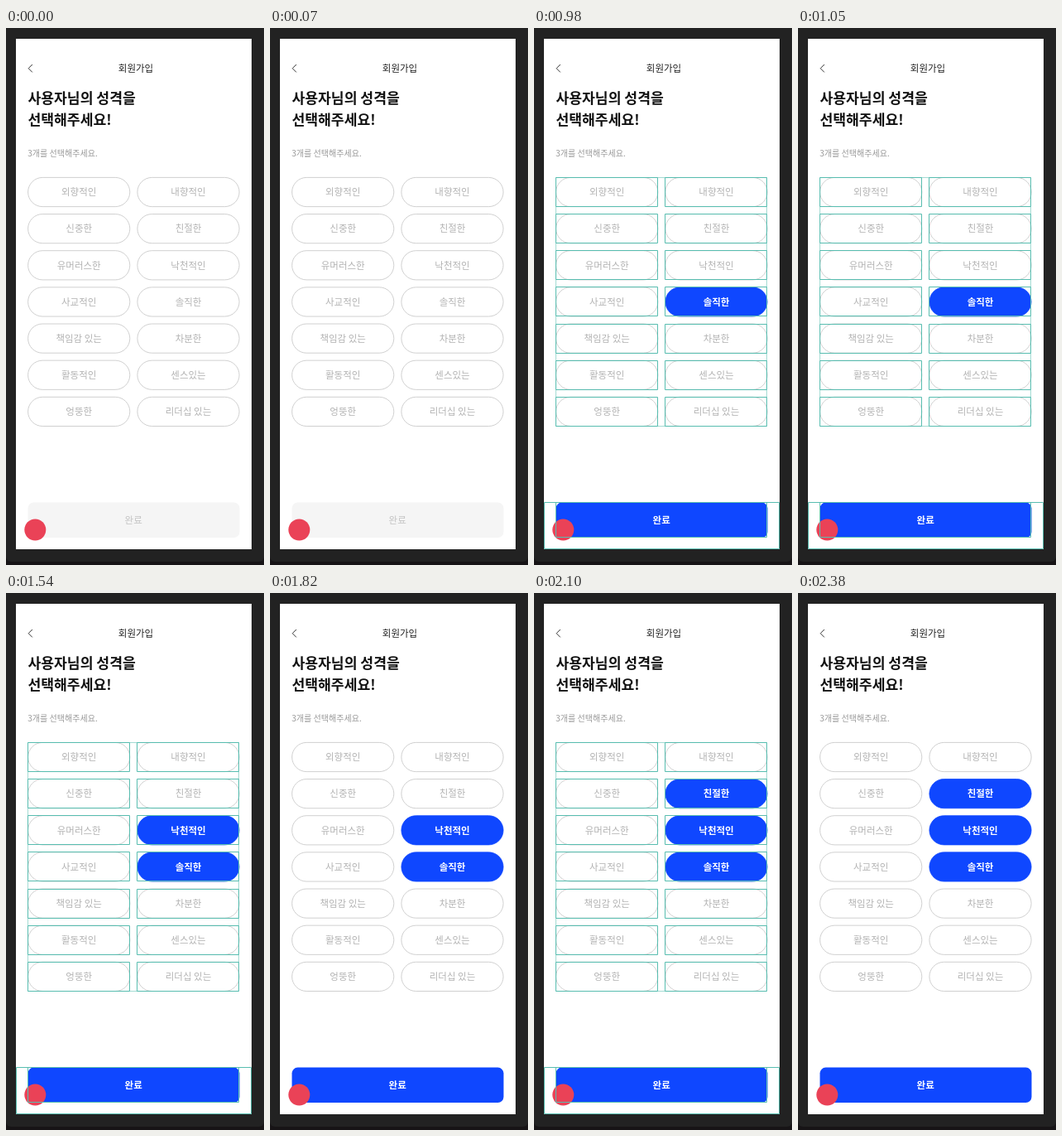
Animation of 312x648 px, one loop 3.29 s. Source, as an HTML page with a canvas:

```html
<!DOCTYPE html>
<html lang="ko">
<head>
<meta charset="utf-8">
<title>회원가입</title>
<style>
  html, body { margin: 0; width: 100%; height: 100%; overflow: hidden; background: #222; }
  canvas { display: block; width: 312px; height: 648px; }
</style>
</head>
<body>
<canvas id="stage"></canvas>
<script>
const W = 312, H = 648, LOOP = 3290, FLASH = 280;
const BLUE = '#0f47ff', TEAL = '#58bdb0';
const FONT = '"Noto Sans CJK KR", "Noto Sans CJK", "Noto Sans CJK JP", sans-serif';

const traits = [
  ['외향적인', '내향적인'],
  ['신중한', '친절한'],
  ['유머러스한', '낙천적인'],
  ['사교적인', '솔직한'],
  ['책임감 있는', '차분한'],
  ['활동적인', '센스있는'],
  ['엉뚱한', '리더십 있는']
];
// Row of the right column chosen at each time
const picks = [{ at: 980, row: 3 }, { at: 1540, row: 2 }, { at: 2100, row: 1 }];

const canvas = document.getElementById('stage');
const ctx = canvas.getContext('2d');
const ratio = window.devicePixelRatio || 1;
canvas.width = W * ratio;
canvas.height = H * ratio;
ctx.scale(ratio, ratio);

function box(x, y, w, h, r, fill, line, width = 0.8) {
  ctx.beginPath();
  ctx.roundRect(x, y, w, h, r);
  if (fill) {
    ctx.fillStyle = fill;
    ctx.fill();
  }
  if (line) {
    ctx.strokeStyle = line;
    ctx.lineWidth = width;
    ctx.stroke();
  }
}

function text(str, x, y, size, weight, color, align = 'center') {
  ctx.font = `${weight} ${size}px ${FONT}`;
  ctx.textAlign = align;
  ctx.fillStyle = color;
  ctx.fillText(str, x, y);
}

function outline(x, y, w, h, alpha = 1) {
  ctx.globalAlpha = alpha;
  box(x + 0.5, y + 0.5, w, h, 0, null, TEAL, 1);
  ctx.globalAlpha = 1;
}

const rowTop = row => 180.4 + row * 44.15;
const colLeft = col => 26.6 + col * 132.3;

function drawShell() {
  ctx.fillStyle = '#171416';
  ctx.fillRect(0, 0, W, H);
  box(0, 0, W, 644, [0, 0, 6, 6], '#222222');
  ctx.fillStyle = '#fff';
  ctx.fillRect(12, 13, 285, 616);
}

function drawHeader() {
  ctx.beginPath();
  ctx.moveTo(31.8, 44);
  ctx.lineTo(27.2, 48.7);
  ctx.lineTo(31.8, 53.4);
  ctx.strokeStyle = '#333';
  ctx.lineWidth = 1;
  ctx.stroke();
  text('회원가입', 157, 52.7, 11.5, 500, '#222');
  text('사용자님의 성격을', 26.4, 91, 17.2, 700, '#111', 'left');
  text('선택해주세요!', 26.4, 116.6, 17.2, 700, '#111', 'left');
  text('3개를 선택해주세요.', 26.2, 155.2, 10.05, 400, '#999', 'left');
}

function drawTraits(chosen) {
  traits.forEach((pair, row) => pair.forEach((label, col) => {
    const x = colLeft(col), y = rowTop(row);
    const on = col === 1 && chosen.includes(row);
    box(x, y, 123.2, 35.2, 17.6, on ? BLUE : '#fff', on ? BLUE : '#c4c4c4');
    text(label, x + 61.6, y + 21.9, 11.5, on ? 700 : 500, on ? '#fff' : '#b3b3b3');
  }));
}

function drawFooter(active) {
  box(26.5, 572.6, 256, 42.4, 7, active ? BLUE : '#f5f5f5');
  text('완료', 154.2, 597.7, 11.5, active ? 700 : 500, active ? '#fff' : '#c4c4c4');
}

function drawOutlines() {
  outline(26, 180, 255, 300, 0.55);
  traits.forEach((pair, row) => pair.forEach((_, col) => {
    outline(26 + col * 132, Math.round(rowTop(row) - 0.4), 123, 35);
  }));
  outline(12, 572, 284, 56);
  outline(26, 572, 255, 42);
}

function drawBadge() {
  ctx.beginPath();
  ctx.arc(35.3, 605.5, 13, 0, Math.PI * 2);
  ctx.fillStyle = '#ea4257';
  ctx.fill();
}

function draw(t) {
  const done = picks.filter(p => t >= p.at);
  drawShell();
  drawHeader();
  drawTraits(done.map(p => p.row));
  drawFooter(done.length > 0);
  drawBadge();
  if (done.some(p => t < p.at + FLASH)) drawOutlines();
}

const start = performance.now();
function tick() {
  draw((performance.now() - start) % LOOP);
  requestAnimationFrame(tick);
}
tick();
</script>
</body>
</html>
```
